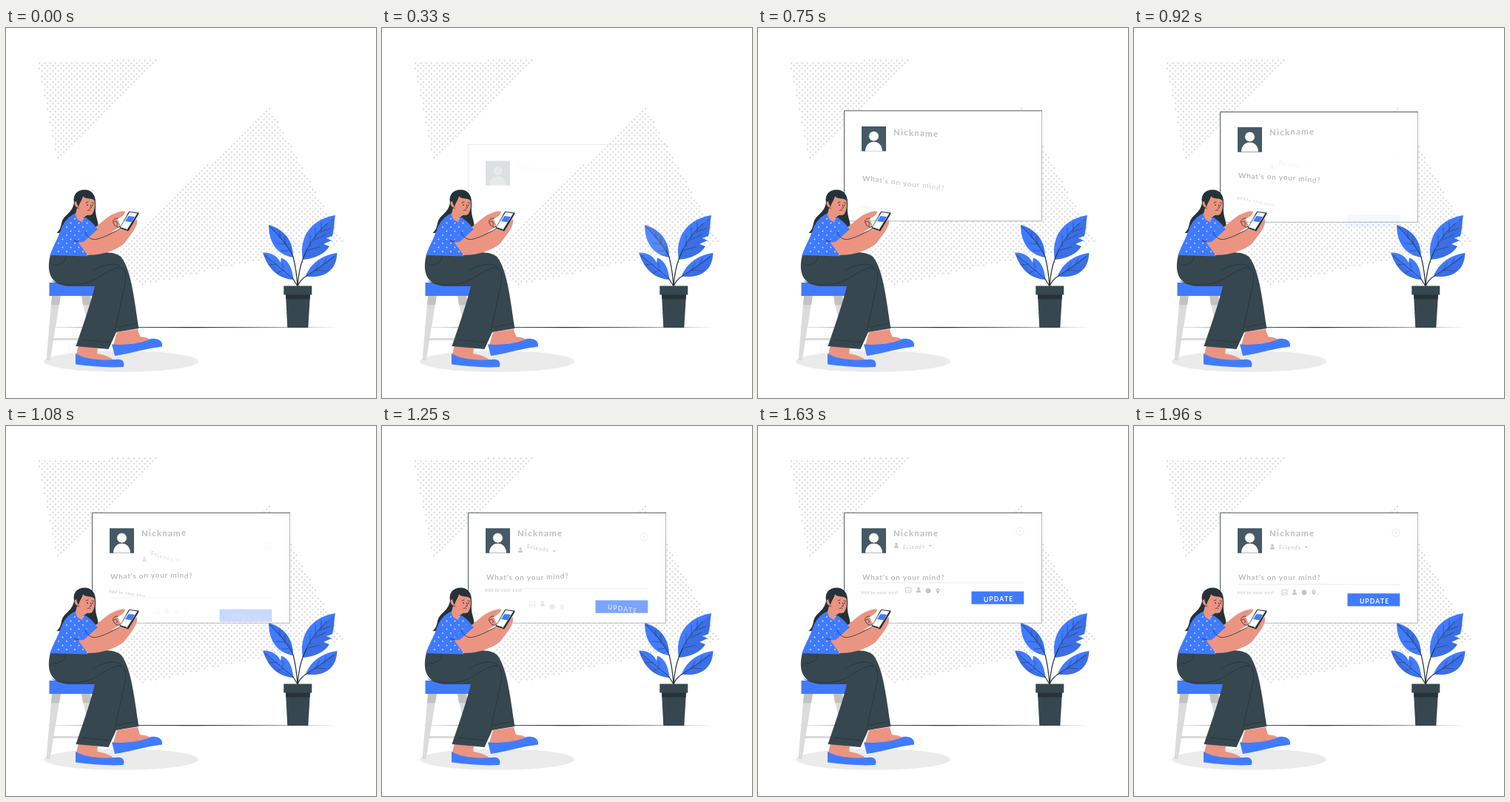
An HTML page for the animation above (2 s loop, 500x500 px).

```html
<!DOCTYPE html>
<html lang="en">
<head>
<meta charset="utf-8">
<title>Status update</title>
<style>
html, body { margin: 0; width: 100%; height: 100%; overflow: hidden; background: #fff; }
svg { display: block; width: 100vw; height: 100vh; }
text { font-family: Lato, "Open Sans", sans-serif; fill: #bdbdbd; white-space: pre; }
.blue { fill: #407bff; }
.dark { fill: #263238; }
.slate { fill: #37474f; }
.skin { fill: #eb9481; }
.grey { fill: #c4c4c4; }
.shade { fill: #000; fill-opacity: .1; }
.line { fill: none; stroke: #263238; stroke-width: .8; stroke-linecap: round; stroke-linejoin: round; }
.stem { stroke-width: 1.2; }
.fine { stroke-width: .5; }
.dots { fill: none; stroke-linecap: round; }
.backdrop { stroke: #dcdcdc; stroke-width: 2.5; }
</style>
</head>
<body>
<svg viewBox="0 0 500 500">
  <path class="dots backdrop" id="dotsA"/>
  <path class="dots backdrop" id="dotsB"/>
  <ellipse cx="155.5" cy="450.5" rx="104.5" ry="14.3" fill="#ebebeb"/>
  <path class="dark" d="M50 404.6L250 404.1 450 404.6 250 405.2Z"/>

  <g id="plant">
    <path class="blue" d="M355 266C371 271 388 282 388 310C368 307 355 292 355 266Z"/>
    <path class="blue" d="M347 303.500C355 303 366 306 371 317L372 310.500C382 314 387 325 388.500 340C370 339 355 328 347 303.500Z"/>
    <path class="blue" d="M445 253C418 257 395 277 401 313C418 312 432 304 437 295L429 292 440 287 433 284 441 281C444 271 443 262 445 253Z"/>
    <path class="blue" d="M447.500 304C430 306 411 317 405 335.500C426 338 446 332 447.500 304Z"/>
    <path class="shade" d="M355 266C371 271 388 282 388 310C378 294 368 280 355 266ZM347 303.500C355 328 370 339 388.500 340C370 331 357 317 347 303.500ZM445 253C432 266 410 287 401 313C418 312 432 304 437 295L429 292 440 287 433 284 441 281C444 271 443 262 445 253ZM447.500 304C436 314 417 326 405 335.500C426 338 446 332 447.500 304Z"/>
    <path class="line stem" d="M388 309C391 321 393 335 394 349C396 325 400 313 406 301M388 339L394 349C397 341 401 338 406 335"/>
    <path class="line" d="M357 269C370 282 383 296 388 309M406 301C412 288 420 277 434 264M350 307C364 320 377 329 388 339M406 335C420 326 430 320 443 309"/>
    <path class="line fine" d="M370 284V276M377 293V283M376 292L366 291M382 301L373 301M366 319L355 320M376 327L366 331M374 325V318M411 295V281M418 284V270M426 274V263M408 300L424 296M416 287L432 279M424 276L438 271M419 326L423 317M430 318L433 311M417 327L432 328"/>
    <path class="slate" d="M378 360H411L408.300 405H380.300Z"/>
    <path class="dark" d="M378 360H411L410.500 366.500H378.500Z"/>
    <path class="slate" d="M375.300 348.500H413.300V360.500H375.300Z"/>
  </g>

  <g id="card">
    <g data-delay="0">
      <rect x="116.500" y="117.300" width="267" height="149" fill="#fff"/>
      <path class="line" d="M116.500 266.300V117.300H383.500"/>
      <path class="line" style="stroke-width:.35" d="M383.500 117.300V266.300H116.500"/>
    </g>
    <path data-delay="12" class="dark" d="M140 138.500H173V171.500H140Z"/>
    <path data-delay="18" fill="#455a64" d="M140 138.500H173V171.500H140Z"/>
    <g data-delay="25">
      <path fill="#fff" d="M145 171.500C145 154.500 168 154.500 168 171.500Z"/>
      <circle cx="156.500" cy="151.300" r="6.800" fill="#fff" stroke="#455a64" stroke-width=".7"/>
    </g>
    <path data-delay="720" d="M140 214H360" stroke="#e6e6e6" stroke-width=".8"/>
    <g data-delay="715" fill="none" stroke="#e0e0e0" stroke-width=".7">
      <circle cx="354" cy="144.300" r="5.200"/>
      <path d="M352 142.300L356 146.300M356 142.300L352 146.300"/>
    </g>
    <path data-delay="710" class="grey" d="M230.500 162.800H235L232.750 165.300Z"/>
    <path data-delay="770" class="blue" d="M288.500 226.300H359.300V243.500H288.500Z"/>
    <path data-delay="862" fill="none" stroke="#c4c4c4" stroke-width=".8" d="M199.500 221.500H207V228H199.500ZM200 227L202.500 224.500 204 226 205 225 207 227"/>
    <circle data-delay="905" class="grey" cx="230" cy="225" r="3.400"/>
    <path data-delay="920" class="grey" fill-rule="evenodd" d="M243 228.800C239 224 240.500 221.500 243 221.500S247 224 243 228.800ZM243 223A1.100 1.100 0 1 0 243 225.200A1.100 1.100 0 1 0 243 223Z"/>
  </g>

  <g id="stool">
    <path fill="#dbdbdb" d="M62 361H74L59.500 449.500H54.500ZM102 361H114L125 449.500H120ZM64 419H103V422H64Z"/>
    <path fill="#c2c2c2" d="M62.500 361H74L72 374.300H61ZM102 361H114L116 374.300H104Z"/>
    <path class="blue" d="M58.500 344H121V362H58.500Z"/>
  </g>

  <g id="person">
    <path class="dark" d="M92 236C89 252 78 251 75 264C74 270 72 274 68.500 277C79 278 86 271 91 262L115 270 124.500 271C126 262 120 255 121 242C122 227 117 219 107 218.500C96 218.500 90 225 92 236Z"/>
    <path class="skin" d="M150 411L178 407 181 417C190 418 196 420 197 424L160 432 145 428ZM98 429L124 433 123 440C131 441 141 444 147 450L100 450 95 441Z"/>
    <path class="blue" d="M94 440C104 446 118 448 132 448.500C143 449 152 446 157 449C160 452 160 456 158.500 458C138 459.500 115 457 94 454.500ZM143 427.500C163 429 184 426 196 420C207 419 212 424 211 430.500C190 433 167 440 147 443Z"/>
    <path class="slate" d="M60 306L110 307C125 302 148 301 156 310C170 328 174 373 179.500 406L149 411 138.500 434 94.500 430C103 405 114 374 120 349H85C60 347 54 330 60 306Z"/>
    <path class="line" d="M81 308C81 317 72 322 63 320M63 342C74 349 93 348 110 344C127 338 143 324 152 324C162 324 163 332 160 350L147 409M118 328C132 319 148 316 156 323M102 421L140 425M151 404L178 399"/>
    <path class="blue" d="M95 250C84 254 77 263 73 276C67 290 62 299 59.500 307L110 308.500 105 289 124 272C117 263 111 257 103 254Z"/>
    <path class="dots" id="dotsC" stroke="#dce7ff" stroke-width="1.800"/>
    <path class="skin" d="M96 243L113 251 103 257 104 262C97 261 94 256 94 251Z"/>
    <path class="skin" d="M97 232C99 226 112 225 119 231C121 239 120 247 116 252C111 255 102 250 98 243C92 242 91 235 95 234Z"/>
    <path class="dark" d="M96 238C93 228 101 221 108 221C117 221 121 227 120.500 234C118 231 115 231 112 230.500C107 230 105 229 104 227C103 233 99 236 98 242Z"/>
    <path class="line" d="M108 236L111 235M116 236L118.500 237M114 239L115.500 243 113.500 243.500M110 247C111 245.500 113 245.500 114 246.500"/>
    <path class="dark" d="M109.200 239.300a.8 1 0 1 0 1.600 0a.8 1 0 1 0-1.600 0M116 239.500a.8 1 0 1 0 1.600 0a.8 1 0 1 0-1.600 0"/>
    <path class="skin" d="M97 289L110 277C121 270 130 261 140 254C149 249 158 246.500 161 248C160 254 154 256 151 258L155 268 142 276 155 272C163 270 169 263 177 258C179 268 168 280 160 291C146 303 122 308 110 306.500Z"/>
    <path class="blue" d="M94 290C99 286 104 278 109 275L117 266 124 272 105 289Z"/>
    <path class="line" d="M107 276C111 285 117 287 124 285C136 282 147 275 155 271M92 287L98 289M151 257C145 257 143 261 146 265C148 269 152 270 154 268M146 262C149 260 151 262 150 266"/>
    <path class="dark" d="M167 248L179 249.500Q180 250 179.300 251.500L166 273.500Q165 275 163.500 274L153.500 270.500 165.500 249Q166 248 167 248Z"/>
    <path fill="#fff" d="M167 249L177.500 250.500 163.500 272.500 154.500 269.500Z"/>
    <path class="blue" d="M165.500 254L174 255 169.500 262.500 161 261Z"/>
    <path class="dark" d="M154 269L162 271.500 161.500 272.500 153.500 270Z"/>
  </g>
</svg>

<script>
const $ = id => document.getElementById(id);
const card = $('card');
const RISE = 30;

function add(parent, tag, attrs) {
  const el = document.createElementNS('http://www.w3.org/2000/svg', tag);
  for (const key in attrs) el.setAttribute(key, attrs[key]);
  return parent.appendChild(el);
}

// Even-odd test of a point against a polygon
function inside(x, y, poly) {
  let hit = false;
  poly.forEach(([ax, ay], i) => {
    const [bx, by] = poly[(i + 1) % poly.length];
    if (ay > y !== by > y && x < ax + (y - ay) * (bx - ax) / (by - ay)) hit = !hit;
  });
  return hit;
}

// Staggered grid of round dots within a polygon
function dots(id, poly, pitch, x0, y0) {
  let d = '';
  for (let row = 0; row < 70; row++) {
    const y = y0 + row * pitch / 2;
    for (let x = x0 + row % 2 * pitch / 2; x < 460; x += pitch)
      if (inside(x, y, poly)) d += `M${x.toFixed(1)} ${y.toFixed(1)}h0`;
  }
  $(id).setAttribute('d', d);
}
dots('dotsA', [[43, 47], [206, 41.5], [69, 179]], 7.3, 41.5, 43.7);
dots('dotsB', [[356, 106], [456, 290], [180, 348], [148, 303]], 7.3, 137, 109);
dots('dotsC', [[88, 257], [103, 257], [121, 272], [104, 288], [107, 306], [63, 306], [75, 278]], 11, 60, 258);

function bust(x, y, delay) {
  const g = add(card, 'g', { class: 'grey', 'data-delay': delay });
  add(g, 'circle', { cx: x, cy: y - 2, r: 1.8 });
  add(g, 'path', { d: `M${x - 3.2} ${y + 3.2}c0-4.500 6.400-4.500 6.400 0z` });
}
bust(187, 163.3, 700);
bust(217, 224.8, 855);

const letters = [];
function write(str, x, y, size, spacing, weight, delay, step, fill = '') {
  const text = add(card, 'text', {
    x, y, 'font-size': size, 'letter-spacing': spacing, 'font-weight': weight, style: fill && `fill:${fill}`
  });
  for (const char of str) {
    const el = add(text, 'tspan', {});
    el.textContent = char;
    letters.push({ el, y, delay });
    if (char !== ' ') delay += step;
  }
}
write('Nickname', 183, 149.4, 11.5, 1.2, 700, 45, 11);
write("What's on your mind?", 141, 208.3, 10, .7, 700, 135, 13);
write('Add to your post', 139, 226.6, 5.4, .65, 400, 405, 11);
write('Friends', 196, 166.6, 6.8, 1.15, 400, 590, 16);
write('UPDATE', 305, 240.2, 8.6, .95, 700, 755, 13, '#fff');

// Cubic Bezier easing (.457, 0, .49, 1.5) over one second
function ease(ms) {
  const goal = Math.min(1, Math.max(0, ms / 1000));
  let lo = 0, hi = 1;
  for (let i = 0; i < 24; i++) {
    const s = (lo + hi) / 2, r = 1 - s;
    if (3 * r * r * s * .457 + 3 * r * s * s * .49 + s ** 3 < goal) lo = s; else hi = s;
  }
  return 4.5 * lo * lo - 3.5 * lo ** 3;
}

function slide(el, ms) {
  const p = ease(ms);
  el.setAttribute('transform', `translate(0 ${RISE * (1 - p)})`);
  el.setAttribute('opacity', Math.min(1, p));
}

const parts = [...card.querySelectorAll('[data-delay]')];
const start = performance.now();

function draw() {
  const t = (performance.now() - start) % 2000;
  slide(card, t);
  parts.forEach(el => slide(el, t - el.dataset.delay));
  letters.forEach(({ el, y, delay }) => {
    const p = ease(t - delay);
    el.setAttribute('y', y + RISE * (1 - p));
    el.setAttribute('fill-opacity', Math.min(1, p));
  });
  requestAnimationFrame(draw);
}
draw();
</script>
</body>
</html>
```
